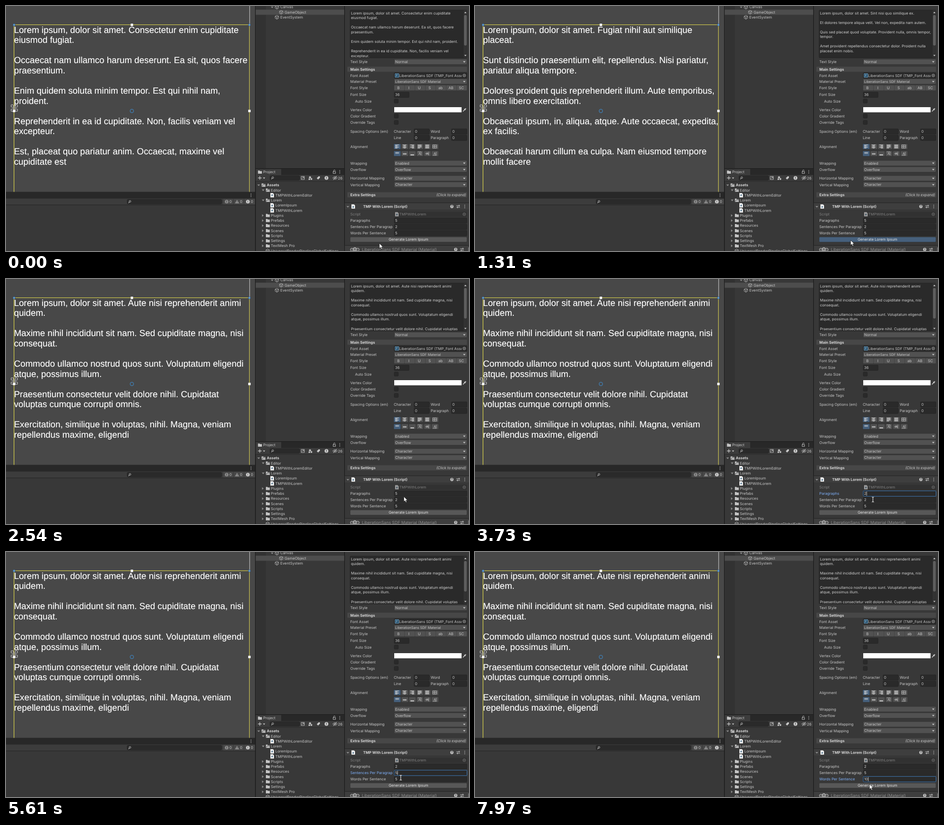
These frames come from a looping animation (1028 px wide and 545 px high, 7.99 s). An HTML page:

```html
<!DOCTYPE html>
<html lang="en">
<head>
<meta charset="utf-8">
<title>Lorem generator</title>
<style>
html, body { margin: 0; width: 100%; height: 100%; overflow: hidden; background: #383838; }
svg { display: block; width: 1028px; height: 545px; }
text { font-family: Inter, Roboto, sans-serif; text-rendering: geometricPrecision; white-space: pre; }
#scene text { font-family: "Liberation Sans", Arial, sans-serif; stroke: #fff; stroke-width: .15px; }
</style>
</head>
<body>
<svg id="stage" viewBox="0 0 1028 545" xmlns="http://www.w3.org/2000/svg"></svg>
<script>
const LOOP = 7990;
const UI = 8.2, BIG = 19.73;
const INK = '#c8c8c8', DIM = '#808080', FIELD = '#2a2a2a', EDGE = '#212121', POP = '#515151';
const PRESSED = '#46607c', FOCUS = '#3a79bb', FOCUS_INK = '#7fb0f8';

// Drawing helpers; y of a label is the middle of its capitals.
const rect = (x, y, w, h, fill, extra = '') =>
  `<rect x="${x}" y="${y}" width="${w}" height="${h}" fill="${fill}" ${extra}/>`;
const path = (d, fill, extra = '') => `<path d="${d}" fill="${fill}" ${extra}/>`;
const line = (d, color, width = 1) => path(d, 'none', `stroke="${color}" stroke-width="${width}"`);
const label = (x, y, s, { size = UI, fill = INK, extra = '' } = {}) =>
  `<text x="${x}" y="${(y + size * 0.364).toFixed(2)}" font-size="${size}" fill="${fill}" ${extra}>${s}</text>`;
const bold = (x, y, s, fill = '#d6d6d6') => label(x, y, s, { fill, extra: 'font-weight="700"' });
const mid = (x, y, s, o = {}) => label(x, y, s, { ...o, extra: 'text-anchor="middle" ' + (o.extra || '') });
const ring = (x, y, r, color, fill = 'none', w = 1) =>
  `<circle cx="${x}" cy="${y}" r="${r}" fill="${fill}" stroke="${color}" stroke-width="${w}"/>`;
const down = (x, y, c = INK, r = 3) => path(`M${x - r} ${y - r / 2}h${2 * r}l${-r} ${r * 1.2}z`, c);
const up = (x, y) => path(`M${x - 2.5} ${y + 1.5}h5l-2.5 -3.2z`, INK);
const right = (x, y) => path(`M${x - 1.5} ${y - 3}v6l3.6 -3z`, '#8b8b8b');
const dots = (x, y) => [-3, 0, 3].map(d => rect(x - .7, y + d - .7, 1.4, 1.4, INK)).join('');
const field = (x, y, w) => rect(x, y - 6, w, 12, FIELD, `rx="1.5" stroke="${EDGE}" stroke-width=".7"`);
const value = (x, y, w, s) => field(x, y, w) + label(x + 2, y, s);
const check = y => rect(862, y - 4.7, 9, 9, FIELD, `rx="1.5" stroke="${EDGE}" stroke-width=".8"`);
const popup = (y, s, size = UI) =>
  rect(862, y - 6, 161.5, 11.8, POP, 'rx="1.5" stroke="#303030" stroke-width=".6"') +
  label(864, y, s, { size }) + down(1017.5, y, INK, 2.7);
const search = (x, y, w) =>
  rect(x, y - 5.2, w, 10.4, FIELD, `rx="2.5" stroke="${EDGE}" stroke-width=".7"`) +
  ring(x + 6.3, y - .7, 1.9, INK) + line(`M${x + 4.9} ${y + .8}l-2 2.2`, INK, 1.1);
const folder = (x, y, c = '#c4c4c4', open = false) =>
  path(`M${x - 4.5} ${y - 3.5}h3.5l1 1.3h4.2v5.8h-8.7z`, c) +
  (open ? line(`M${x - 3.7} ${y + 3}l1.5 -3.5h6.8`, '#383838', .9) : '');
const script = (x, y, o = 1) =>
  `<g opacity="${o}">` + path(`M${x - 4} ${y - 4.8}h5.6l2.4 2.4v7.2h-8z`, '#f2f2f2') +
  mid(x, y + .4, '#', { size: 5.8, fill: '#2f5a78', extra: 'font-weight="700"' }) + '</g>';
const cube = (x, y) =>
  line(`M${x} ${y - 4.2}l3.8 2v4.4l-3.8 2l-3.8 -2v-4.4zM${x - 3.8} ${y - 2.2}l3.8 2l3.8 -2M${x} ${y - .2}v4.4`, '#bdbdbd', .9);
const helpIcons = y =>
  ring(990, y, 3.4, '#c4c4c4', '#c4c4c4', .5) + mid(990, y, '?', { size: 6.5, fill: '#333', extra: 'font-weight="700"' }) +
  line(`M1000 ${y - 1.8}h8M1000 ${y + 1.8}h8M1006 ${y - 3.8}v4M1002.5 ${y - .2}v4`, INK, 1) + dots(1018.5, y);

function sceneView() {
  let s = rect(0, 0, 553, 413.5, '#484848');
  s += rect(0, 413.5, 553, 15, '#282828') + dots(544, 421);
  s += rect(0, 428.5, 553, 13.5, '#3c3c3c') + rect(0, 442, 553, 1, '#232323') + search(269, 435.3, 210);
  s += rect(482.5, 429, 70.5, 12.5, '#484848');
  s += line('M505 429v12.5M528.5 429v12.5', '#303030', .8);
  s += ring(490, 435.3, 3.8, '#8c8c8c', '#8c8c8c', .5) + mid(490, 435.3, '!', { size: 7, fill: '#383838', extra: 'font-weight="700"' });
  s += path('M513 431l4.6 8h-9.2z', '#8c8c8c') + mid(513, 436.2, '!', { size: 6, fill: '#383838' });
  s += ring(537, 435.3, 3.8, '#d5d5d5', '#d5d5d5', .5) + mid(537, 435.3, '!', { size: 7, fill: '#383838', extra: 'font-weight="700"' });
  return s + [496, 519.5, 543.5].map(x => label(x, 435.3, '0')).join('');
}

function gizmo() {
  let s = line('M541 0V42', '#c9c9c9', 1.2) + line('M17.7 413.5V41.6H540.5', '#cfc84c', 1.4) + line('M540.5 42V413.5', '#c9c24f', 1.3);
  for (const [x, y] of [[279.5, 42], [18, 233.5], [540.5, 233.5]]) s += rect(x - 2.7, y - 2.7, 5.4, 5.4, '#fff');
  for (const x of [18, 540.5]) s += ring(x, 42, 2.4, '#2e5d8c', '#6ba3d8');
  s += ring(279.5, 233.5, 3.8, '#3f83bd', 'none', 1.3);
  for (const a of [45, 135, 225, 315])
    s += path('M0 -1.5L3.2 -7L0 -10L-3.2 -7Z', 'none', `stroke="#dcdcdc" stroke-width=".9" transform="translate(18.5 227) rotate(${a})"`);
  return s;
}

function hierarchy() {
  let s = rect(553, 0, 1.5, 545, '#191919') + rect(554.5, 0, 196.5, 361, '#383838') + rect(554.5, 0, 22.5, 361, '#323232');
  s += rect(554.5, 8.2, 196.5, 11.3, '#4d4d4d');
  s += down(591, 2.7, '#8b8b8b') + cube(601.5, 2.5) + label(609, 2.5, 'Canvas');
  return s + cube(611, 13.8) + label(618.5, 13.8, 'GameObject') + cube(601.5, 25) + label(609, 25, 'EventSystem');
}

function project() {
  let s = rect(554.5, 361, 196.5, 1.5, '#191919') + rect(554.5, 362.5, 196.5, 13.5, '#282828') + rect(554.5, 362.5, 56.5, 13.5, '#3c3c3c');
  s += folder(564, 369.5) + label(571, 369.5, 'Project');
  s += line('M727.3 368.5v-1.8a1.9 1.9 0 0 1 3.8 0', INK) + rect(726.3, 368.5, 5.4, 4, 'none', `stroke="${INK}" stroke-width=".9"`) + dots(741, 369);
  s += rect(554.5, 376, 196.5, 14, '#3c3c3c') + rect(554.5, 389.5, 196.5, .8, '#232323');
  s += line('M559.5 382.5h8M563.5 378.5v8', INK, 1.3) + down(573, 382.8, INK, 2.5) + search(586, 382.5, 66);
  s += line('M655.5 379h7v7h-7zM657 384.5l3.5 -3.5M658 380.5h3v3', INK, .9);
  s += path('M675 378.5l3 2.6l-3 2.6l-3 -2.6z', INK) + ring(678, 384.8, 1.9, INK, INK, .3) + rect(671.8, 383.6, 3.2, 3.2, INK);
  s += path('M690 383l4 -4h3v3l-4 4z', INK);
  s += ring(711.5, 382.5, 4, INK, INK, .5) + mid(711.5, 382.5, '!', { size: 7, fill: '#333', extra: 'font-weight="700"' });
  s += line('M725.5 382.5q5 -5.5 10 0q-5 5.5 -10 0M726.5 387l8 -9', INK) + ring(730.5, 382.5, 1, INK, INK) + label(737, 382.7, '26');
  s += down(561, 398.5, '#8b8b8b') + folder(572, 398.3, '#c4c4c4', true) + bold(579, 398.4, 'Assets');
  const rows = ['v Editor', '# TMPWithLoremEditor', 'v Lorem', '# LoremIpsum', '# TMPWithLorem', '> Plugins', '> Prefabs',
    '> Resources', '> Scenes', '> Scripts', '> Settings', '> TextMesh Pro', '= UniversalRenderPipelineGlobalSettings'];
  rows.forEach((row, i) => {
    const y = +(409.6 + i * 11.26).toFixed(2), kind = row[0], name = row.slice(2);
    if (kind === '#') s += script(591, y) + label(598, y, name);
    else if (kind === '=') s += cube(581, y) + label(588, y, name);
    else s += (kind === 'v' ? down(571, y, '#8b8b8b') : right(570, y)) + folder(581.5, y, '#c4c4c4', kind === 'v') + label(588, y, name);
  });
  return s;
}

function alignment() {
  let s = '';
  for (let row = 0; row < 2; row++) for (let i = 0; i < 6; i++) {
    const x = +(868 + i * 16.75).toFixed(2), y = row ? 328.3 : 312.6;
    s += rect(x - 7, y - 5.8, 15.6, 11.6, i ? POP : PRESSED, 'stroke="#2f2f2f" stroke-width=".6"');
    if (row && i > 2) {
      s += mid(x, y, 'A', { size: 7.5 }) + line(`M${x + 3.4} ${y - 4}v8M${x - 4} ${y + (i - 4) * 4}h8`, INK, .8);
    } else if (row) {
      s += line(`M${x - 3.5} ${y - 2.5 + i * 2.5}h8M${x - 3.5} ${y - .5 + i * 2}h8`, '#d8d8d8', 1.1);
    } else if (i === 5) {
      s += line(`M${x - 4} ${y - 3.5}h8.5v7h-8.5zM${x - 4} ${y}h8.5M${x} ${y - 3.5}v7`, INK, .9);
    } else {
      for (let k = 0; k < 4; k++) {
        const w = (k % 2 && i < 3) || (i === 3 && k === 3) ? 5 : 8.5;
        const dx = i === 1 ? (8.5 - w) / 2 : i === 2 ? 8.5 - w : 0;
        s += rect(x - 4 + dx, y - 4 + k * 2.2, w, 1.3, '#dcdcdc');
      }
    }
  }
  return s;
}

function inspector() {
  let s = rect(751, 0, 1.5, 545, '#191919') + rect(752.5, 0, 276, 545, '#383838');
  s += rect(764, 9, 260, 106.5, FIELD, `rx="2" stroke="${EDGE}" stroke-width=".8"`);
  s += rect(1016, 9.5, 8, 105.5, '#323232') + rect(1017, 20, 6, 68, '#5e5e5e', 'rx="3"') + up(1020, 14.5) + down(1020, 110, INK, 2.5);

  const labels = [['Text Style', 124.5], ['Font Asset', 154.7], ['Material Preset', 168.5], ['Font Style', 182.2], ['Font Size', 197.5],
    ['Vertex Color', 231], ['Color Gradient', 245.2], ['Override Tags', 259.2], ['Spacing Options (em)', 279.2], ['Alignment', 312.7],
    ['Wrapping', 350], ['Overflow', 364], ['Horizontal Mapping', 383.5], ['Vertical Mapping', 397.7]];
  for (const [name, y] of labels) s += label(764.5, y, name);
  s += label(775, 211.7, 'Auto Size');
  s += popup(124.2, 'Normal') + popup(168, 'LiberationSans SDF Material', 7.6);
  s += popup(349.7, 'Enabled') + popup(363.8, 'Overflow') + popup(383.3, 'Character') + popup(397.5, 'Character');

  s += rect(758, 135, 265.5, 11.3, '#474747', 'rx="1"') + bold(764.5, 140.6, 'Main Settings');
  s += rect(758, 414.2, 265.5, 11.5, '#474747', 'rx="1"') + bold(764.5, 420, 'Extra Settings');
  s += label(1021.5, 419.8, '(Click to expand)', { extra: 'text-anchor="end" font-style="italic"' });

  s += field(862, 154.6, 161.5) + rect(864, 150.6, 8, 8, '#274f6a', 'stroke="#7fb6dc" stroke-width=".8"');
  s += mid(868, 154.7, 'F', { size: 6.5, fill: '#bfe0f6' });
  s += `<svg x="862" y="146" width="149.5" height="16" style="width:149.5px;height:16px" viewBox="862 146 149.5 16">${label(873, 154.7, 'LiberationSans SDF (TMP_Font Asset)')}</svg>`;
  s += ring(1017.5, 154.5, 3, INK, 'none', .9) + ring(1017.5, 154.5, .8, INK, INK, .4);

  ['B', 'I', 'U', 'S', 'ab', 'AB', 'SC'].forEach((c, i) => {
    const x = 862 + i * 23.1;
    s += rect(x.toFixed(1), 176.3, 22.6, 11.4, POP, 'rx="1"') + mid((x + (i < 4 ? 9.4 : 10.4)).toFixed(1), 182, c);
  });
  s += value(862, 197.5, 33, '36') + check(211.7) + check(245) + check(259.2);
  s += rect(862, 225, 149.5, 11.5, '#fff');
  s += line('M1014.5 234.5l4 -4', INK, 1.6) + line('M1017.5 229l2.5 2.5M1019 230l2.2 -2.2', INK, 2);
  s += label(861, 279.2, 'Character') + value(906, 279.2, 34, '0') + label(943, 279.2, 'Word') + value(989, 279.2, 34.5, '0');
  s += label(861, 293.2, 'Line') + value(906, 293.2, 34, '0') + label(943, 293.2, 'Paragraph') + value(989, 293.2, 34.5, '0');
  s += alignment();

  s += rect(752.5, 437.6, 276, 16, '#3e3e3e') + rect(752.5, 437.3, 276, .9, '#1f1f1f') + rect(752.5, 453.4, 276, .6, '#303030');
  s += down(759, 446.5, '#8b8b8b') + script(771, 446) + bold(793, 446.2, 'TMP With Lorem (Script)') + helpIcons(446);
  s += label(764.5, 463.4, 'Script', { fill: DIM });
  s += rect(862, 457.4, 161.5, 11.8, '#313131', 'rx="1.5"') + script(867.8, 463.2, .55) + label(873, 463.4, 'TMPWithLorem', { fill: DIM });
  s += ring(1017.5, 463.2, 3, DIM, 'none', .9) + ring(1017.5, 463.2, .8, DIM, DIM, .4);

  s += rect(752.5, 532.5, 276, 13, '#3e3e3e') + rect(752.5, 532, 276, .9, '#1f1f1f');
  s += ring(768, 542, 3.4, '#bdbdbd', '#555') + ring(774.5, 541, 3.8, '#dcdcdc', '#777') + ring(781, 542, 3.4, '#bdbdbd', '#555');
  s += label(790, 541.6, 'LiberationSans SDF Material (Material)', { size: 9.2, fill: '#8c8c8c' });
  return s + `<g transform="translate(8.5 0)">${helpIcons(541.5)}</g>`;
}

const opening = 'Lorem ipsum, dolor sit amet. ';
const passages = [
  ['Consectetur enim cupiditate eiusmod fugiat.', 'Occaecat nam ullamco harum deserunt. Ea sit, quos facere praesentium.',
    'Enim quidem soluta minim tempor. Est qui nihil nam, proident.',
    'Reprehenderit in ea id cupiditate. Non, facilis veniam vel excepteur.',
    'Est, placeat quo pariatur anim. Occaecat, maxime vel cupiditate est'],
  ['Sint nisi quo similique ex.', 'Et dolores tempore aliqua velit. Vel non, expedita nam autem.',
    'Quis sed placeat quod voluptate. Provident nulla, omnis tempor, tempor.',
    'Amet provident repellendus consectetur dolor. Proident nulla placeat enim nobis.',
    'Illum quos magna veniam harum. Culpa sunt, dolore minim aliqua'],
  ['Fugiat nihil aut similique placeat.', 'Sunt distinctio praesentium elit, repellendus. Nisi pariatur, pariatur aliqua tempore.',
    'Dolores proident quis reprehenderit illum. Aute temporibus, omnis libero exercitation.',
    'Obcaecati ipsum, in, aliqua, atque. Aute occaecat, expedita, ex facilis.',
    'Obcaecati harum cillum ea culpa. Nam eiusmod tempore mollit facere'],
  ['Aute nisi reprehenderit animi quidem.', 'Maxime nihil incididunt sit nam. Sed cupiditate magna, nisi consequat.',
    'Commodo ullamco nostrud quos sunt. Voluptatum eligendi atque, possimus illum.',
    'Praesentium consectetur velit dolore nihil. Cupidatat voluptas cumque corrupti omnis.',
    'Exercitation, similique in voluptas, nihil. Magna, veniam repellendus maxime, eligendi'],
];

const pen = document.createElement('canvas').getContext('2d');
function wrap(passage, font, width) {
  pen.font = font;
  const out = [];
  passage.forEach((para, i) => {
    let row = '';
    for (const word of ((i ? '' : opening) + para).split(' ')) {
      const next = row ? row + ' ' + word : word;
      if (pen.measureText(next).width > width) { out.push(row); row = word; } else row = next;
    }
    out.push(row, '');
  });
  return out;
}
const setLines = (rows, x, y, pitch, size, fill) => rows.map((s, i) =>
  s && `<text x="${x}" y="${(y + i * pitch).toFixed(2)}" font-size="${size}" fill="${fill}">${s}</text>`).join('');
const bigText = passages.map(p => setLines(wrap(p, `${BIG}px "Liberation Sans", Arial, sans-serif`, 525), 17.7, 59.8, 22.54, BIG, '#fff'));
const areaText = passages.map(p => setLines(wrap(p, `${UI}px Inter, Roboto, sans-serif`, 247).slice(0, 11), 766, 18.5, 10.56, UI, '#d2d2d2'));

const inputs = [['Paragraphs', 477.3], ['Sentences Per Paragrap', 491.3], ['Words Per Sentence', 505.3]];

document.getElementById('stage').innerHTML =
  sceneView() + '<g id="scene"></g>' + gizmo() + hierarchy() + project() + inspector() +
  '<svg x="764" y="9" width="252" height="106" style="width:252px;height:106px" viewBox="764 9 252 106"><g id="area"></g></svg><g id="form"></g>' +
  `<g id="arrow">${path('M0 0V11.2L2.6 8.8L4.4 13L6.4 12.1L4.6 8.1H8.2Z', '#fff', 'stroke="#1c1c1c" stroke-width=".8"')}</g>` +
  `<g id="beam">${line('M-2.5 -5.5Q0 -5.5 0 -4Q0 -5.5 2.5 -5.5M0 -4V4M-2.5 5.5Q0 5.5 0 4Q0 5.5 2.5 5.5', '#e8e8e8', 1.2)}</g>`;
const el = id => document.getElementById(id);

// Steps: [time, value], held until the next one.
const sceneSteps = [[0, 0], [480, 1], [1290, 2], [1930, 3]];
const areaSteps = [[0, 0], [510, 1], [1330, 2], [1950, 3]];
const pressSteps = [[0, 0], [400, 1], [510, 0], [1180, 1], [1330, 0], [1850, 1], [1950, 0]];
const focusSteps = [[0, -1], [2900, 0], [4990, 1], [5880, 2]];
const selectSteps = [[0, 0], [2900, 1], [3520, 0], [4990, 1], [5380, 0], [5880, 1], [6650, 0]];
const valueSteps = [[[0, '5'], [3520, '2']], [[0, '2'], [5380, '5']], [[0, '5'], [6650, '1'], [6950, '10']]];
const beamSteps = [[0, 0], [2660, 1], [7900, 0]];
const track = [[20, 829, 528], [300, 834, 521], [1970, 834, 521], [2560, 883.5, 484], [2850, 880, 478], [3490, 880, 478],
  [3710, 883.5, 490.5], [5400, 883.5, 490.5], [5610, 876.5, 502], [5800, 876, 505], [7810, 876, 505], [7960, 876, 516.5]];

const at = (steps, t) => steps.reduce((v, s) => s[0] <= t ? s[1] : v, steps[0][1]);
function pointer(t) {
  const i = track.findIndex(p => p[0] > t);
  if (i === 0) return track[0].slice(1);
  if (i < 0) return track[track.length - 1].slice(1);
  const [a, b] = [track[i - 1], track[i]], u = (t - a[0]) / (b[0] - a[0]), e = u * u * (3 - 2 * u);
  return [a[1] + (b[1] - a[1]) * e, a[2] + (b[2] - a[2]) * e];
}

function form(t) {
  const focus = at(focusSteps, t), selected = at(selectSteps, t);
  let s = '';
  inputs.forEach(([name, y], i) => {
    const on = i === focus, text = at(valueSteps[i], t);
    pen.font = `${UI}px Inter, Roboto, sans-serif`;
    const w = pen.measureText(text).width;
    s += label(764.5, y, name, { fill: on ? FOCUS_INK : INK }) + field(862, y, 161.5);
    if (on) {
      s += rect(862, y - 6, 161.5, 12, 'none', `rx="1.5" stroke="${FOCUS}" stroke-width="1"`);
      s += selected ? rect(864, y - 4.8, w, 9.6, '#3d6ea5') : rect(864.3 + w, y - 4.6, .9, 9.2, '#d8d8d8');
    }
    s += label(864, y, text, { fill: '#d2d2d2' });
  });
  const fill = at(pressSteps, t) ? PRESSED : '#585858';
  return s + rect(764, 513.8, 259.5, 11.4, fill, 'rx="2" stroke="#2c2c2c" stroke-width=".7"') +
    mid(893.7, 519.5, 'Generate Lorem Ipsum', { fill: '#e4e4e4' });
}

const shown = {};
function put(id, html) {
  if (shown[id] !== html) el(id).innerHTML = shown[id] = html;
}
const start = performance.now();
function frame() {
  const t = (performance.now() - start) % LOOP;
  put('scene', bigText[at(sceneSteps, t)]);
  put('area', areaText[at(areaSteps, t)]);
  put('form', form(t));
  const [x, y] = pointer(t), beam = at(beamSteps, t);
  for (const id of ['arrow', 'beam']) {
    el(id).setAttribute('transform', `translate(${x.toFixed(2)} ${y.toFixed(2)})`);
    el(id).style.display = (id === 'beam') == beam ? '' : 'none';
  }
  requestAnimationFrame(frame);
}
frame();
</script>
</body>
</html>
```
